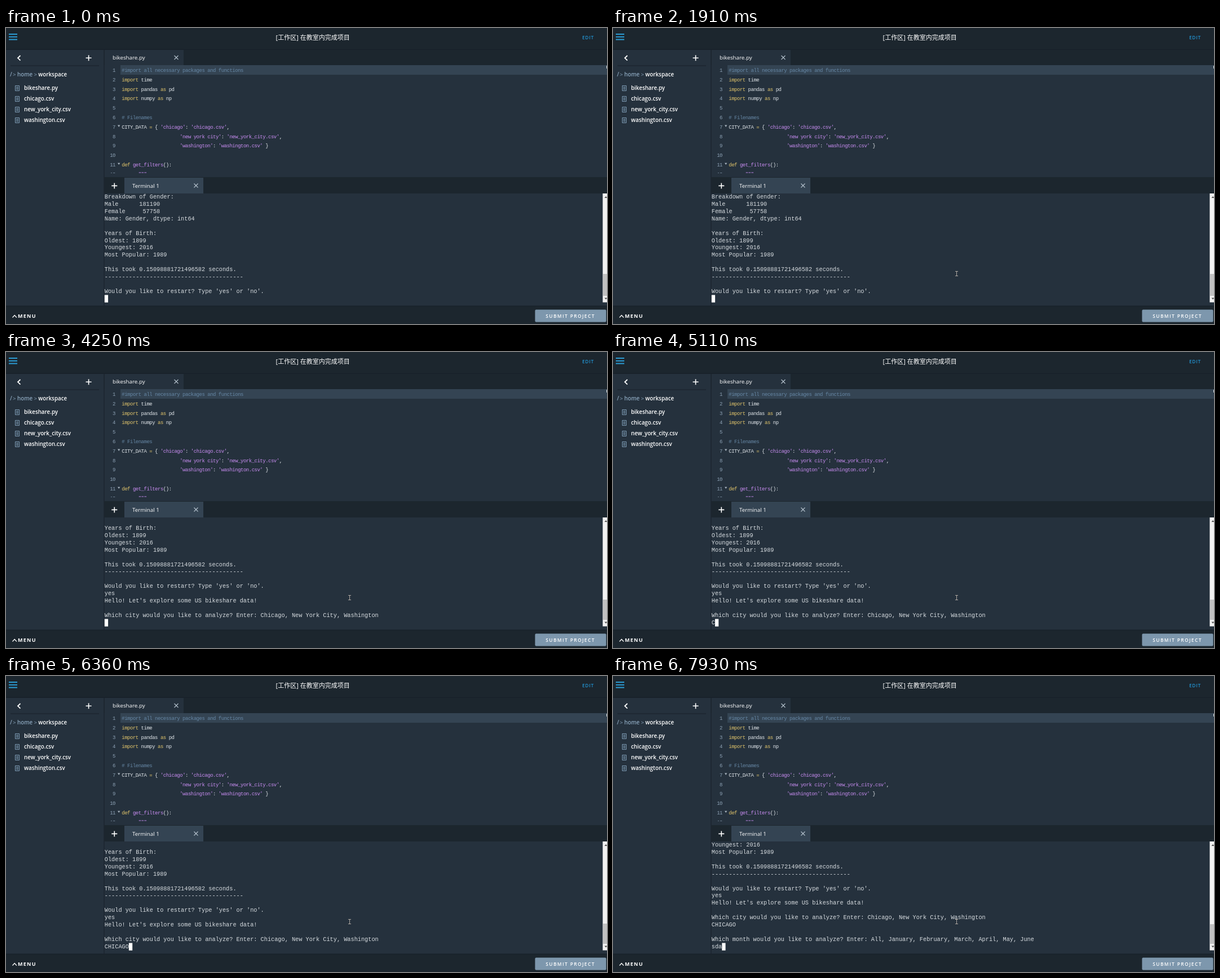
These frames come from a looping animation (1066x526 px, 8 s). An HTML page:

```html
<!DOCTYPE html>
<html lang="zh">
<head>
<meta charset="utf-8">
<title>Workspace</title>
<style>
html, body { margin: 0; width: 100%; height: 100%; overflow: hidden; background: #25313d; }
svg { display: block; width: 100%; height: 100%; }
text { white-space: pre; fill: #fff; font: 9.8px "Open Sans", sans-serif; }
.semi { font-weight: 600; }
.muted { fill: #8ba6bd; }
.title { font: 11px "Open Sans", "Noto Sans CJK SC", "Noto Sans CJK", sans-serif; }
.caps { font-size: 8.4px; font-weight: 600; letter-spacing: 1.4px; }
.code text { font: 9px "Liberation Mono", monospace; letter-spacing: -.5px; fill: #e1e6ea; }
.code .number { fill: #8da2b5; text-anchor: end; }
.comment { fill: #6687a5; }
.keyword { fill: #e2c56b; }
.string { fill: #c98df2; }
.term text { font: 10.26px "Liberation Mono", monospace; fill: #d8dde1; }
.line { fill: none; stroke: #fff; }
#pointer { mix-blend-mode: difference; stroke-opacity: .75; }
</style>
</head>
<body>
<svg id="stage" viewBox="0 0 1066 526"></svg>
<script>
const LOOP = 8000;
const BG = '#25313d', DARK = '#1c262e', EDGE = '#18212a', ACTIVE = '#344453';

const rect = (x, y, w, h, fill, extra = '') =>
  `<rect x="${x}" y="${y}" width="${w}" height="${h}" fill="${fill}" ${extra}/>`;
const text = (x, y, body, cls = '') => `<text x="${x}" y="${y}" class="${cls}">${body}</text>`;
const line = (d, width = 1, color = '#fff') =>
  `<path class="line" d="${d}" style="stroke:${color};stroke-width:${width}"/>`;
const plus = (x, y) => line(`M${x - 5} ${y}h10M${x} ${y - 5}v10`, 1.6);
const cross = (x, y) => line(`M${x - 3.5} ${y - 3.5}l7 7m0 -7l-7 7`, 1.1, '#b5c2cd');
const span = (cls, body) => `<tspan class="${cls}">${body}</tspan>`;
const comment = s => span('comment', s);
const key = s => span('keyword', s);
const str = s => span('string', s);

const fileIcon = y => line(`M16.5 ${y - 4.5}h7v9h-7zM18 ${y - 2}h4M18 ${y}h4M18 ${y + 2}h4`, 1, '#7f9db6');
const files = ['bikeshare.py', 'chicago.csv', 'new_york_city.csv', 'washington.csv'];

const code = [
  comment('#import all necessary packages and functions'),
  key('import') + ' time',
  key('import') + ' pandas ' + key('as') + ' pd',
  key('import') + ' numpy ' + key('as') + ' np',
  '',
  comment('# Filenames'),
  `CITY_DATA ${key('=')} { ${str("'chicago'")}: ${str("'chicago.csv'")},`,
  ' '.repeat(21) + `${str("'new york city'")}: ${str("'new_york_city.csv'")},`,
  ' '.repeat(21) + `${str("'washington'")}: ${str("'washington.csv'")} }`,
  '',
  `${key('def')} ${str('get_filters')}():`,
  ' '.repeat(6) + str('"""')
];
const codeRows = code.map((body, i) => {
  const y = 78 + i * 16.8;
  return text(194, y, i + 1, 'number') + text(205.3, y, body);
}).join('');
const fold = y => `<path d="M198 ${y}h4.4l-2.2 3.4z" fill="#aab6c0"/>`;

const log = [
  'Breakdown of Gender:', 'Male      181190', 'Female     57758', 'Name: Gender, dtype: int64', '',
  'Years of Birth:', 'Oldest: 1899', 'Youngest: 2016', 'Most Popular: 1989', '',
  'This took 0.15098881721496582 seconds.', '-'.repeat(40), '',
  "Would you like to restart? Type 'yes' or 'no'.", 'yes',
  "Hello! Let's explore some US bikeshare data!", '',
  'Which city would you like to analyze? Enter: Chicago, New York City, Washington', 'CHICAGO', '',
  'Which month would you like to analyze? Enter: All, January, February, March, April, May, June'
];
const ROWS = 15, ROW = 12.89, CHAR = 6.157, LEFT = 174.8;

// time, first visible log line, typed input
const typing = [
  [0, 0, ''], [3160, 0, 'y'], [3240, 0, 'ye'], [3550, 0, 'yes'],
  [4250, 4, ''], [5110, 4, 'C'], [5450, 4, 'CHI'], [5650, 4, 'CHIC'],
  [5880, 4, 'CHICA'], [6130, 4, 'CHICAG'], [6360, 4, 'CHICAGO'],
  [6830, 7, ''], [7600, 7, 's'], [7880, 7, 'sd'], [7930, 7, 'sda']
];
const thumbTop = { 0: 437, 4: 440, 7: 441 };

// Pointer path: sampled steps of time, x, y
const pointerSteps = [[0, -50, -50]];
function addMove(start, gap, count, from, to) {
  for (let i = 1; i <= count; i++) {
    const p = i / count, ease = p * p * (3 - 2 * p);
    pointerSteps.push([start + (i - 1) * gap,
      from[0] + (to[0] - from[0]) * ease, from[1] + (to[1] - from[1]) * ease]);
  }
}
addMove(300, 77, 8, [660, 508], [171, 466]);
addMove(916, 77, 3, [171, 466], [180, 483]);
addMove(1600, 77.5, 5, [180, 483], [609.5, 436.5]);

const stage = document.getElementById('stage');
stage.innerHTML = [
  rect(0, 0, 1066, 526, BG),
  rect(0, 0, 1066, 38, DARK), rect(0, 37.5, 1066, 1.5, EDGE),
  line('M5 11h15M5 15.8h15M5 20.6h15', 2, '#2b9cd3'),
  text(478.6, 20.5, '[工作区] 在教室内完成项目', 'title'),
  '<text x="1022" y="19.5" class="caps" style="fill:#2293d0;letter-spacing:.7px">EDIT</text>',

  line('M25.5 49l-4.5 4.3l4.5 4.3', 1.8), plus(146.6, 53.3),
  rect(8, 66.5, 157, 1, EDGE),
  text(7, 85.5, '/', 'semi muted'), text(12, 85.5, '&gt;', 'muted'),
  text(20, 85.5, 'home', 'semi muted'), text(49.5, 85.5, '&gt;', 'muted'),
  text(57.3, 85.5, 'workspace', 'semi'),
  ...files.map((name, i) => fileIcon(107 + i * 19) + text(32, 109.5 + i * 19.1, name, 'semi')),
  rect(173.5, 39, 1, 455, EDGE),

  rect(174, 39, 892, 27, DARK), rect(175, 39, 140, 27, BG),
  text(189, 56.3, 'bikeshare.py'), cross(302, 52.5),
  rect(203, 66, 863, 17, ACTIVE), rect(1065, 67, 1, 5, '#dfe5ea'),
  `<g class="code">${codeRows}</g>`, fold(172.5), fold(239.7),
  rect(175, 258, 891, 7, BG),

  rect(174, 265, 892, 29, DARK), rect(210, 266, 140, 28, ACTIVE),
  plus(192.3, 280.4), text(224, 283.8, 'Terminal 1'), cross(337, 280),
  '<g class="term">',
  ...Array.from({ length: ROWS }, (_, i) => text(LEFT, (303.2 + i * ROW).toFixed(2), '', 'row')),
  '</g>',
  rect(LEFT, 474.4, 6.3, 13.3, '#fff', 'id="cursor"'),
  rect(1058.4, 294, 7.6, 193.5, '#f1f1f1'),
  rect(1059, 437, 7, 39, '#c1c1c1', 'id="thumb"'),
  '<path d="M1061.5 302l2.5 -3l2.5 3zM1061.5 479.5l2.5 3l2.5 -3z" fill="#505050"/>',

  rect(0, 494, 1066, 32, DARK), rect(0, 493.5, 1066, 1.5, EDGE),
  line('M11.5 514.5l3.7 -4l3.7 4', 1.2),
  '<text x="21" y="515.3" style="font-size:9.1px;font-weight:700;letter-spacing:1.2px">MENU</text>',
  rect(938.4, 500.4, 126.2, 22.2, '#7d97ad', 'rx="2"'),
  text(957.3, 514.6, 'SUBMIT PROJECT', 'caps'),
  '<path id="pointer" class="line" d="M-2.5 -4h5M0 -4v8M-2.5 4h5"/>'
].join('');

const rows = [...stage.querySelectorAll('.row')];
const [cursor, thumb, pointer] = ['cursor', 'thumb', 'pointer'].map(id => document.getElementById(id));
const stepAt = (steps, t) => steps.findLast(step => step[0] <= t);

let shown;
function draw(t) {
  const state = stepAt(typing, t);
  if (state !== shown) {
    const [, first, input] = shown = state;
    rows.forEach((row, i) => {
      row.textContent = i === ROWS - 1 ? input : log[first + i];
    });
    cursor.setAttribute('x', LEFT + input.length * CHAR);
    thumb.setAttribute('y', thumbTop[first]);
    thumb.setAttribute('height', 476 - thumbTop[first]);
  }
  const [, x, y] = stepAt(pointerSteps, t);
  pointer.setAttribute('transform', `translate(${x} ${y})`);
}

const start = performance.now();
function tick() {
  draw((performance.now() - start) % LOOP);
  requestAnimationFrame(tick);
}
tick();
</script>
</body>
</html>
```
